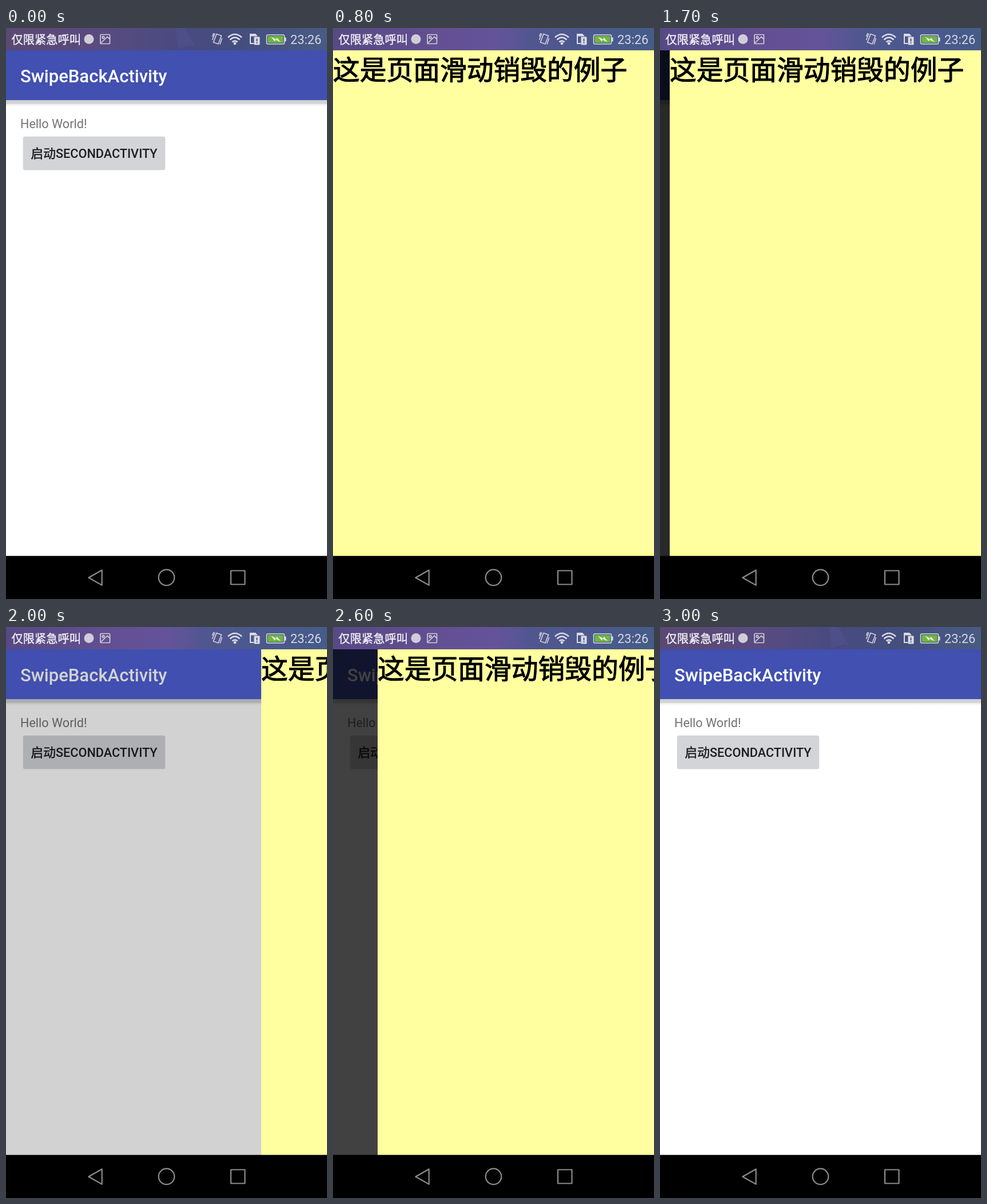
An HTML page that plays this animation: 561x998 px, repeating every 3500 ms.

```html
<!DOCTYPE html>
<html lang="zh">
<head>
<meta charset="utf-8">
<title>Swipe back</title>
<style>
html, body { margin: 0; width: 100%; height: 100%; overflow: hidden; background: #000; }
svg { display: block; width: 100vw; height: 100vh; }
text { font-family: Roboto, "Noto Sans CJK SC", "Noto Sans CJK", sans-serif; white-space: pre; }
</style>
</head>
<body>
<svg viewBox="0 0 561 998" preserveAspectRatio="none">
  <defs>
    <linearGradient id="calm">
      <stop offset="0" stop-color="#5a4972"/>
      <stop offset=".3" stop-color="#594b81"/>
      <stop offset=".55" stop-color="#484a80"/>
      <stop offset=".75" stop-color="#444f7e"/>
      <stop offset="1" stop-color="#495b84"/>
    </linearGradient>
    <linearGradient id="vivid">
      <stop offset="0" stop-color="#564a84"/>
      <stop offset=".3" stop-color="#614f91"/>
      <stop offset=".5" stop-color="#655399"/>
      <stop offset=".62" stop-color="#50568f"/>
      <stop offset="1" stop-color="#455c89"/>
    </linearGradient>
    <linearGradient id="drop" x2="0" y2="1">
      <stop offset="0" stop-color="#cccdd0"/>
      <stop offset=".58" stop-color="#d5d6d9"/>
      <stop offset=".66" stop-color="#eeeeef"/>
      <stop offset="1" stop-color="#fff"/>
    </linearGradient>
    <filter id="soft" x="-10%" y="-20%" width="120%" height="150%">
      <feGaussianBlur stdDeviation="1.3"/>
    </filter>
  </defs>

  <g id="home">
    <rect y="39" width="561" height="884" fill="#fff"/>
    <rect y="126" width="561" height="11" fill="url(#drop)"/>
    <rect id="bar" y="39" width="561" height="87"/>
    <text x="25" y="94.5" font-size="31" font-weight="500" fill="#fff">SwipeBackActivity</text>
    <text x="25" y="175" font-size="21.6" fill="#737373">Hello World!</text>
    <rect id="lift" x="29.5" y="192" width="249" height="59" rx="4" fill="#888" filter="url(#soft)"/>
    <rect x="29.5" y="189.5" width="249" height="59" rx="4" fill="#e2e2e5"/>
    <rect id="button" y="190" height="58" rx="3" fill="#d3d4d8"/>
    <text x="43.5" y="227" font-size="21.7" font-weight="500" fill="#1d1d20"><tspan stroke="#1d1d20" stroke-width=".5">启动</tspan>SECONDACTIVITY</text>
  </g>
  <rect id="shade" y="39" width="561" height="884"/>
  <g id="page">
    <rect y="39" width="561" height="884" fill="#ffff9f"/>
    <text y="90" font-size="46.75" stroke="#000" stroke-width="1.1">这是页面滑动销毁的例子</text>
  </g>

  <rect id="status" width="561" height="39"/>
  <path d="M296 0H312L331 33L322 30L300 37Z" fill="#5d5698" opacity=".3"/>
  <text x="9.5" y="27.7" font-size="20.25" fill="#f2f0f5" stroke="#f2f0f5" stroke-width=".4">仅限紧急呼叫</text>
  <circle cx="145" cy="19.5" r="8.5" fill="#d0cdd8"/>
  <g fill="none" stroke="#d0cdd8" stroke-width="1.7">
    <rect x="165" y="11.5" width="16.5" height="16" rx="1"/>
    <circle cx="170" cy="16.5" r="1.8"/>
    <path d="M166 26L177 15.5L181 19"/>
    <path d="M368 10.5L376.5 13.5L371 28L362.5 25ZM365 9.5L360.5 21M363 9L360.5 15M377.5 18L374 28.5"/>
  </g>
  <path d="M388 16.5Q400 5.5 412 16.5M391.5 20.5Q400 12.5 408.5 20.5M395.5 24.5Q400 20.5 404.5 24.5"
    fill="none" stroke="#dcdce6" stroke-width="2.6"/>
  <circle cx="400" cy="27" r="2.4" fill="#dcdce6"/>
  <path d="M427 14V27H433" fill="none" stroke="#dcdce6" stroke-width="2"/>
  <path d="M426 10H436L440 14.5H426Z" fill="#dcdce6"/>
  <rect x="433.5" y="15.5" width="10" height="14" rx="1" fill="#dcdce6"/>
  <path d="M438.5 18.5V23.5M438.5 25V27" stroke="#4a5482" stroke-width="2"/>
  <rect x="455.5" y="12" width="31" height="16" rx="2" fill="none" stroke="#dcdce6" stroke-width="1.5"/>
  <rect x="457.5" y="14" width="27" height="12" fill="#6fb83f"/>
  <path d="M487 16.5H489.5V23.5H487Z" fill="#dcdce6"/>
  <path d="M463.5 15.5L472 20L473.5 17L480 24.5L471 20.8L469.5 23.5Z" fill="#f0f4ee"/>
  <text x="497" y="28" font-size="21.8" fill="#d6d9e4">23:26</text>

  <rect y="922.7" width="561" height="76"/>
  <g fill="none" stroke="#8c8c8c" stroke-width="2.2" stroke-linejoin="round">
    <path d="M144.300 960.700L167.700 947.500V973.900Z"/>
    <circle cx="280.500" cy="960.500" r="13.800"/>
    <rect x="393" y="948.500" width="24.500" height="24"/>
  </g>
</svg>
<script>
const LOOP = 3500, STEP = 100, WIDTH = 561;
const OPEN = 700, CLOSE = 3000;
const $ = id => document.getElementById(id);
const set = (id, attrs) => {
  for (const name in attrs) $(id).setAttribute(name, attrs[name]);
};

// Finger drag: [time, left edge of the upper page]
const drag = [
  [800, 0], [900, 0], [1200, 122], [1400, 300], [1700, 17],
  [2000, 446], [2200, 460], [2600, 78], [2800, 220], [CLOSE, WIDTH]
];

function slope(i) {
  const a = drag[Math.max(i - 1, 0)], b = drag[Math.min(i + 1, drag.length - 1)];
  return (b[1] - a[1]) / (b[0] - a[0]);
}

function offset(t) {
  if (t <= 900) return 0;
  if (t >= CLOSE) return WIDTH;
  const i = drag.findIndex(k => k[0] > t) - 1;
  const [t0, x0] = drag[i], [t1, x1] = drag[i + 1];
  const d = t1 - t0, u = (t - t0) / d, v = 1 - u;
  const x = x0 * v * v * (1 + 2 * u) + x1 * u * u * (3 - 2 * u)
    + d * u * v * (slope(i) * v - slope(i + 1) * u);
  return Math.min(WIDTH, Math.max(0, Math.round(x)));
}

function draw(t) {
  const open = t >= OPEN && t < CLOSE;
  const entering = open && t < OPEN + STEP;
  const x = offset(t);
  const dim = open ? 0.867 * (1 - x / WIDTH) : 0;
  const raised = t >= 500 && t < 800;

  set("page", {
    visibility: open ? "visible" : "hidden",
    opacity: entering ? 0.6 : 1,
    transform: `translate(${x} ${entering ? 30 : 0})`
  });
  set("shade", { opacity: entering ? dim / 2 : dim });
  // The bar keeps its full colour under a light shade
  set("bar", { fill: dim > 0 && dim < 0.25 ? "#4e60d5" : "#4150b1" });
  set("lift", { opacity: raised ? (t < 600 ? 0.5 : 0.8) : 0 });
  set("button", raised ? { x: 29, width: 250 } : { x: 30, width: 248 });
  set("status", { fill: open ? "url(#vivid)" : "url(#calm)" });
}

function tick() {
  const t = performance.now() % LOOP;
  draw(Math.floor(t / STEP) * STEP);
  requestAnimationFrame(tick);
}
tick();
</script>
</body>
</html>
```
